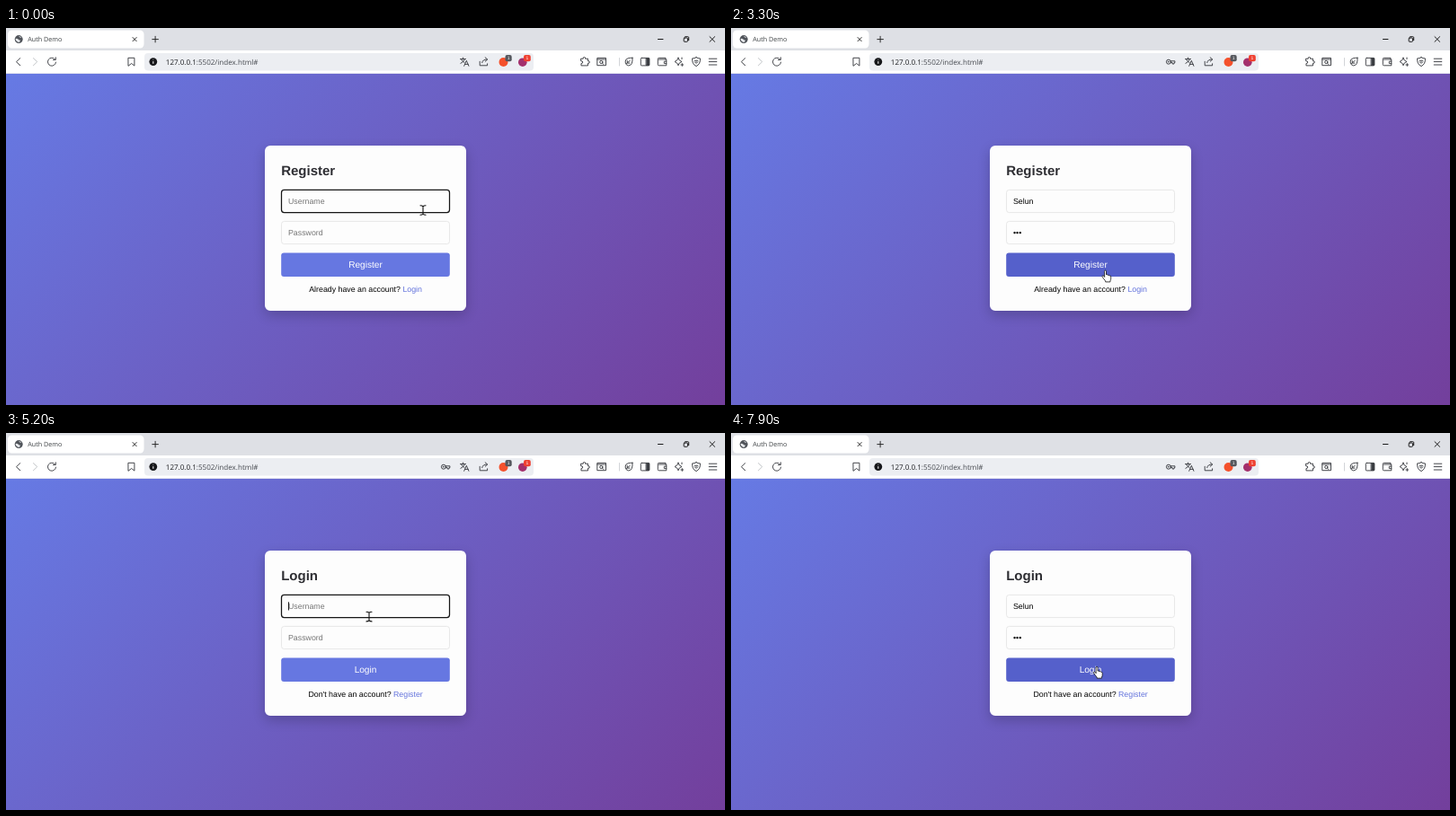
These frames come from a looping animation (800x420 px, 8 s). An HTML page:

```html
<!DOCTYPE html>
<html lang="en">
<head>
<meta charset="utf-8">
<title>Auth Demo</title>
<style>
  html, body { margin: 0; width: 100%; height: 100%; overflow: hidden; }
  .page {
    position: absolute; left: 0; top: 51px; width: 800px; height: 369px;
    background: linear-gradient(135deg, #667ae4, #733f9c);
  }
  .card {
    position: absolute; left: 288px; top: 80px; width: 224px; height: 184px;
    border-radius: 6px; background: #fdfdfd; box-shadow: 0 5px 14px rgba(0, 0, 0, .2);
  }
  svg { position: absolute; left: 0; top: 0; }
  text { text-rendering: geometricPrecision; white-space: pre; font: 8.8px "Liberation Sans", Arial, sans-serif; }
  .ui { font-family: "Open Sans", "Noto Sans", sans-serif; }
  .line { fill: none; stroke: #3a3d42; stroke-width: .95; stroke-linecap: round; stroke-linejoin: round; }
  .field { fill: #fdfdfd; stroke: #dedede; stroke-width: .7; }
  .field.focus { stroke: #161616; stroke-width: 1.25; }
  .hint { fill: #757575; }
  .link { fill: #6272dc; }
  #title { font-size: 15px; font-weight: bold; fill: #2e2e33; }
  #action { font-size: 10.1px; fill: #fff; }
  .badge { font-size: 5px; fill: #fff; }
</style>
</head>
<body>
<div class="page"><div class="card"></div></div>
<svg width="800" height="420" viewBox="0 0 800 420">
  <!-- tab strip -->
  <rect width="800" height="26" fill="#dee0e5"/>
  <rect x="2" y="2.5" width="151.500" height="20" rx="4.500" fill="#fff"/>
  <rect y="25" width="800" height="25.500" fill="#fff"/>
  <rect y="50.500" width="800" height=".5" fill="#c9cbe0"/>
  <rect x="154" y="28" width="433" height="19.500" rx="4" fill="#eceef2"/>
  <circle cx="14.200" cy="12.600" r="4.500" fill="#50545a"/>
  <path d="M10.500 12q2-.8 3 .5t2 1-.8 2.600q-3.600-.6-4.200-4.100M14 9.200q1.600 1.600 3.300 1.500-.7-1.800-3.300-1.500" fill="#e8eaed"/>
  <text class="ui" x="24.200" y="15.300" style="font-size:7.2px" fill="#3c4043">Auth Demo</text>
  <g class="line">
    <path d="M141 10.500l4.200 4.200m0-4.200l-4.200 4.200M162.800 12.600h6.600m-3.300-3.300v6.600" stroke="#222"/>
    <path d="M725.500 12.500h5.500M783 9.700l5.600 5.600m0-5.600l-5.600 5.600" stroke="#111"/>
    <rect x="754.200" y="11" width="4.300" height="4.300" rx=".8" stroke="#111"/>
    <path d="M755.700 9.700h3q1 0 1 1v3" stroke="#111"/>
  </g>

  <!-- address bar -->
  <g class="line">
    <path d="M15.800 33.600l-4.300 4.100 4.300 4.100"/>
    <path d="M30.400 33.600l4.300 4.100-4.300 4.100" stroke="#bfc2c6"/>
    <path d="M54.300 34.600a4.500 4.500 0 1 0 1.200 3.500M55.300 32.800v2.700h-2.800"/>
    <path d="M136.300 33.300h6.600v8.800l-3.300-2.600-3.300 2.600z"/>
    <path d="M527.200 37.300v4.500h8.400v-2M529.700 38.700q.2-3.700 5.700-3.700m-2.200-2.200l2.500 2.200-2.500 2.300"/>
    <path d="M505.500 34.600h6m-3-1.500v1.500m2 0q-1 3.300-4.600 4.800m.5-4.800q1 2.600 3.600 4M509.700 42.300l2.600-6 2.600 6m-4.300-1.900h3.500"/>
    <g id="key">
      <circle cx="486.900" cy="37.700" r="2.500"/>
      <circle cx="486.600" cy="37.700" r=".4"/>
      <path d="M489.300 36.800h4.600v1.800h-.9v1.400h-1.900v-1.400h-1.800"/>
    </g>
  </g>
  <circle cx="163.800" cy="37.600" r="4.400" fill="#16171a"/>
  <path d="M163.800 37.100v2.700M163.800 35.200v.5" stroke="#fff" stroke-width="1"/>
  <text class="ui" x="177.800" y="40.500" style="font-size:8.06px" fill="#1b1c1f">127.0.0.1<tspan fill="#45484e">:5502/index.html#</tspan></text>

  <circle cx="553.500" cy="38" r="5" fill="#f4512c"/>
  <rect x="555.500" y="30" width="7.200" height="7.200" rx="2" fill="#55585e"/>
  <text class="badge" x="557.700" y="35.400">1</text>
  <circle cx="574.800" cy="38.200" r="4.800" fill="#a3306c"/>
  <rect x="576" y="30" width="7.800" height="7.200" rx="2" fill="#ef4131"/>
  <text class="badge" x="578.500" y="35.400">1</text>

  <g class="line">
    <path d="M640 34.200h2.300q-.6-1.700 1.100-1.700t1.100 1.700h3v2.600q1.800-.5 1.800 1.200t-1.800 1.200v2.700h-7.500v-2.400q1.700.1 1.700-1.400t-1.700-1.400z"/>
    <path d="M667.500 37v-3.600h-9.700v8.300h9.700V37M657.800 35h9.700"/>
    <circle cx="662.300" cy="38" r="1.600"/>
    <path d="M663.500 39.200l1.300 1.300"/>
    <path d="M682.500 33.500v8.500" stroke="#d0d2d6"/>
    <path d="M697 33.200q.6 8.700-4.400 8.700a4.200 4.200 0 0 1-.4-8.200q2.200-.5 4.800-.5zM694.300 36.300l-3.800 3.200M691.300 36.500v2.600h2.700"/>
    <rect x="706.300" y="33.400" width="9.600" height="8.500" rx="1"/>
    <path d="M712.500 33.800h3v7.700h-3z" fill="#3a3d42"/>
    <path d="M734 35v-1.600h-7.500q-1.200 0-1.200 1v6.200q0 1.200 1.200 1.200h8.300V35h-8.500M734.800 37.200h-2.500v2.400h2.500"/>
    <path d="M748 33.200q.6 3.600 4 4.300-3.400.8-4 4.300-.7-3.500-4-4.300 3.300-.7 4-4.300zM752.300 39.600v2.800m-1.400-1.400h2.800M752 33v1.600"/>
    <path d="M768 32.700q2 1.400 4.400 1.200 .5 6.300-4.400 8.700-4.900-2.400-4.400-8.700 2.400.2 4.400-1.200zM765.900 36.800q2.100-1.700 4.200 0M766.700 38.300q1.300-1 2.600 0M768 39.700v.1"/>
    <path d="M781.800 34.200h9.400m-9.400 3.400h9.400m-9.400 3.400h9.400" stroke-linecap="butt"/>
  </g>

  <!-- form -->
  <text id="title" x="306.200" y="163.600"></text>
  <rect class="field" id="userBox" x="306.500" y="180.400" width="187" height="25.200" rx="3"/>
  <rect class="field" id="passBox" x="306.500" y="215.400" width="187" height="25.200" rx="3"/>
  <text id="user" x="314" y="195.700"></text>
  <text id="pass" x="314" y="230.700"></text>
  <path id="caret" d="M0 0v9.200" stroke="#000" stroke-width=".9"/>
  <rect id="button" x="306.200" y="250.400" width="187.600" height="26.600" rx="3"/>
  <text id="action" x="400" y="267.200" text-anchor="middle"></text>
  <text x="400.100" y="294.100" text-anchor="middle"><tspan id="ask"></tspan> <tspan id="swap" class="link"></tspan></text>

  <g id="mouse" stroke-linejoin="round" stroke-linecap="round">
    <path id="beam" d="M-3-5.300q2 0 3 .9 1-.9 3-.9M0-4.400v8.800M-3 5.300q2 0 3-.9 1 .9 3 .9" fill="none" stroke="#111" stroke-width="1.100"/>
    <path id="hand" d="M-1 .9q0-1.200 1-1.200t1 1.200v3.600q1.600-.6 1.900.6 1.500-.5 1.800.6 1.500-.2 1.500 1.200v2q0 1.400-.8 2.700v1h-5.200v-1q-1.800-2-3.500-4.600-.6-1.300.5-1.500t1.800 1.300z" fill="#fff" stroke="#111" stroke-width=".8"/>
    <path id="arrow" d="M0 0v9.700l2.200-2 1.500 3.500 1.600-.7-1.500-3.400h3z" fill="#fff" stroke="#222" stroke-width=".7"/>
  </g>
</svg>
<script>
  const LOOP = 8000, STEP = 100, KEY_GAP = 140, FADE = 300, NAME = "Selun";
  const $ = id => document.getElementById(id);
  const show = (id, on) => { $(id).style.display = on ? "" : "none"; };
  const write = (id, text) => { if ($(id).textContent !== text) $(id).textContent = text; };
  const clamp = v => Math.min(1, Math.max(0, v));

  // Two passes through the form: focus and blur times, first keys, hover span of the button
  const passes = [
    { from: 0, userFocus: -500, userKeys: 300, passFocus: 1000, passKeys: 1100, blur: 2400,
      title: "Register", ask: "Already have an account?", swap: "Login" },
    { from: 3900, userFocus: 4800, userKeys: 5500, passFocus: 6300, passKeys: 6700, blur: 7500,
      title: "Login", ask: "Don't have an account?", swap: "Register" }
  ];
  const hovers = [[1750, 4400], [7300, LOOP]];
  const REST = [102, 119, 225], HOVER = [85, 96, 203];

  // Pointer stops: time, x, y
  const stops = [
    [0, 464, 203], [1300, 464, 203], [1800, 423, 266.3], [2400, 423, 266.3],
    [3000, 416.5, 270.3], [3800, 416.5, 270.3], [4200, 423, 280], [4400, 423, 280],
    [4800, 404, 204.6], [6900, 404, 204.6], [7500, 407, 260.6], [LOOP, 407, 260.6]
  ];

  function pointer(t) {
    const i = stops.findIndex(s => s[0] > t);
    const [t0, x0, y0] = stops[i - 1], [t1, x1, y1] = stops[i];
    const p = (t - t0) / (t1 - t0), e = p * p * (3 - 2 * p);
    return [x0 + (x1 - x0) * e, y0 + (y1 - y0) * e];
  }

  const typed = (t, first, max) =>
    t < first ? 0 : Math.min(max, 1 + Math.floor((t - first) / KEY_GAP));

  function buttonColour(t) {
    const mix = hovers.reduce((sum, [on, off]) =>
      sum + clamp((t - on) / FADE) - clamp((t - off) / FADE), 0);
    return `rgb(${REST.map((c, i) => Math.round(c + (HOVER[i] - c) * mix))})`;
  }

  function drawField(id, hint, text, focused) {
    write(id, text || hint);
    $(id).classList.toggle("hint", !text);
    $(id + "Box").classList.toggle("focus", focused);
  }

  function draw(t) {
    const s = passes[t < passes[1].from ? 0 : 1];
    const letters = typed(t, s.userKeys, NAME.length);
    const dots = typed(t, s.passKeys, 3);
    const onPass = t >= s.passFocus && t < s.blur;
    const onUser = t >= s.userFocus && t < s.passFocus;

    write("title", s.title);
    write("action", s.title);
    write("ask", s.ask);
    write("swap", s.swap);
    drawField("user", "Username", NAME.slice(0, letters), onUser);
    drawField("pass", "Password", "•".repeat(dots), onPass);
    show("key", t >= 1100);

    // The caret restarts its blink on focus and on each key
    const [id, count, first, focus] = onUser
      ? ["user", letters, s.userKeys, s.userFocus]
      : ["pass", dots, s.passKeys, s.passFocus];
    const last = count ? first + (count - 1) * KEY_GAP : focus;
    show("caret", (onUser || onPass) && Math.floor((t - last) / 500) % 2 === 0);
    const end = count ? $(id).getComputedTextLength() : 0;
    $("caret").setAttribute("transform", `translate(${314.5 + end} ${onUser ? 188.3 : 223.3})`);

    const [x, y] = pointer(t);
    const overButton = y >= 250.5 && y <= 277;
    const overField = (y >= 180 && y <= 206) || (y >= 215 && y <= 241);
    $("button").setAttribute("fill", buttonColour(t));
    $("mouse").setAttribute("transform", `translate(${x} ${y})`);
    show("beam", overField);
    show("hand", overButton);
    show("arrow", !overField && !overButton);
  }

  const start = performance.now();
  function tick() {
    const t = Math.max(0, performance.now() - start) % LOOP;
    draw(Math.floor(t / STEP) * STEP);
    requestAnimationFrame(tick);
  }
  tick();
</script>
</body>
</html>
```
